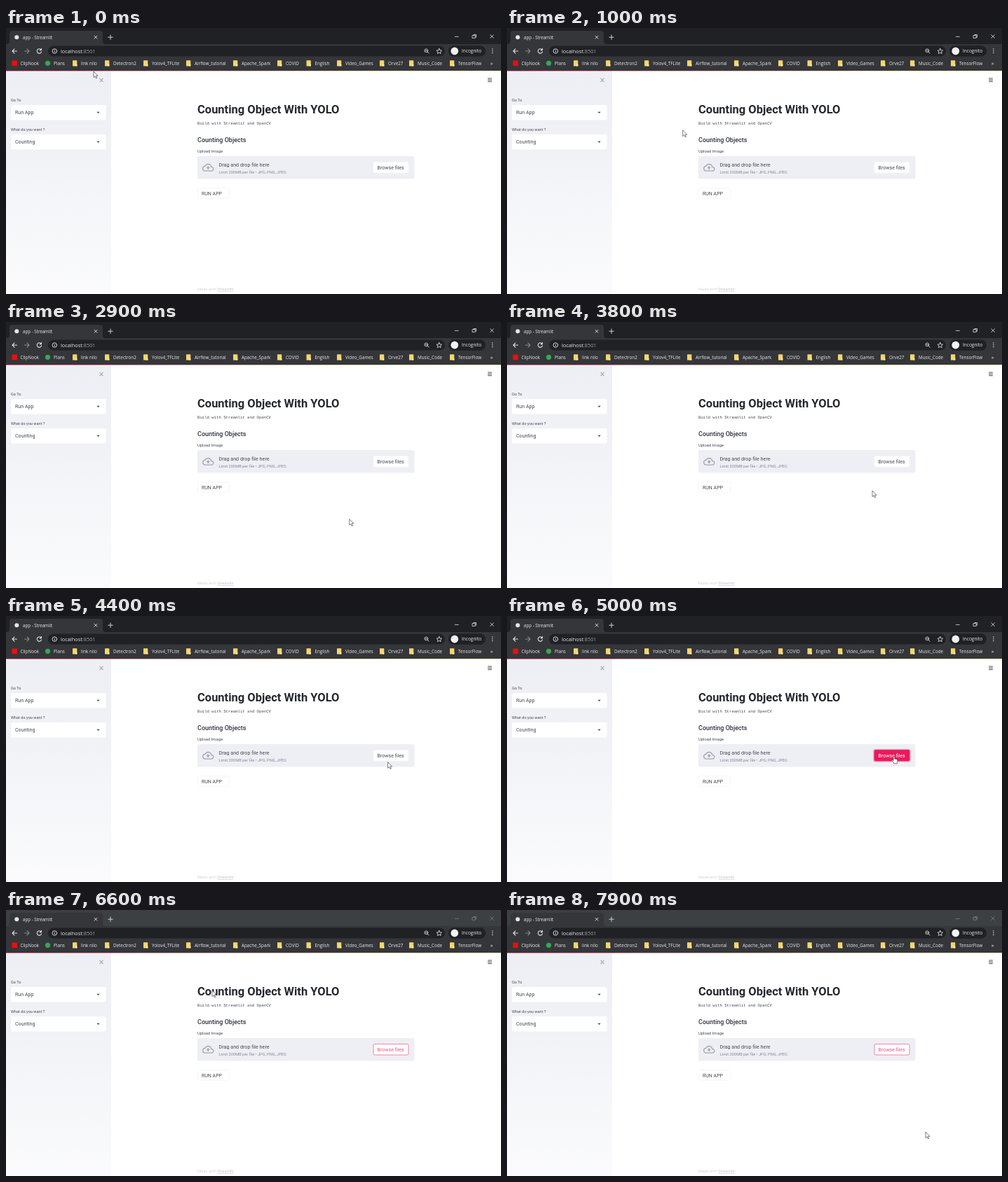
An HTML page for the animation above (8000 ms loop, 706 px wide and 380 px high).

```html
<!DOCTYPE html>
<html lang="en">
<head>
<meta charset="utf-8">
<title>Counting app</title>
<style>
html, body { margin: 0; width: 100%; height: 100%; overflow: hidden; background: #fff; }
svg { display: block; width: 706px; height: 380px; }
.ui { font-family: "Open Sans", "Noto Sans", sans-serif; fill: #e8eaed; }
.page { font-family: Roboto, sans-serif; fill: #474955; }
.mono { font-family: "Liberation Mono", monospace; }
.line { fill: none; stroke-linecap: round; stroke-linejoin: round; }
</style>
</head>
<body>
<svg id="stage" viewBox="0 0 706 380" xmlns="http://www.w3.org/2000/svg">
  <defs>
    <linearGradient id="side" x1="0" y1="0" x2="0" y2="1">
      <stop offset="0" stop-color="#eeeff4"/>
      <stop offset=".36" stop-color="#f1f2f6"/>
      <stop offset=".6" stop-color="#f5f6f9"/>
      <stop offset="1" stop-color="#fbfbfd"/>
    </linearGradient>
    <linearGradient id="trim">
      <stop offset="0" stop-color="#f63366"/>
      <stop offset="1" stop-color="#fffd80"/>
    </linearGradient>
  </defs>
  <rect width="706" height="380" fill="#fff"/>

  <g class="page">
    <rect y="61" width="150" height="319" fill="url(#side)"/>
    <path class="line" d="M133.8 72.2l4.4 4.4m0-4.4l-4.4 4.4" stroke="#a6a8b3" stroke-width="1.2"/>
    <g id="fields"></g>
    <path class="line" d="M687.5 72h5m-5 2.3h5m-5 2.3h5" stroke="#31333f" stroke-width=".9"/>
    <text x="273" y="121.5" font-size="16.5" font-weight="700" fill="#262730">Counting Object With YOLO</text>
    <text class="mono" x="273" y="138" font-size="5.65">Build with Streamlit and OpenCV</text>
    <text x="273" y="163" font-size="9" font-weight="500" fill="#31333f">Counting Objects</text>
    <text x="273" y="178" font-size="5.85">Upload Image</text>
    <rect x="273" y="183" width="309.5" height="32.5" rx="2.5" fill="#eeeff4"/>
    <path transform="translate(280 191) scale(.69)" fill="#a3a6b4" d="M19.35 10.04C18.67 6.59 15.64 4 12 4 9.11 4 6.6 5.64 5.35 8.04 2.34 8.36 0 10.91 0 14c0 3.31 2.69 6 6 6h13c2.76 0 5-2.24 5-5 0-2.64-2.05-4.78-4.65-4.96zM19 18H6c-2.21 0-4-1.79-4-4 0-2.05 1.53-3.76 3.56-3.97l1.07-.11.5-.95C8.08 7.14 9.94 6 12 6c2.62 0 4.88 1.86 5.39 4.43l.3 1.5 1.53.11c1.56.1 2.78 1.41 2.78 2.96 0 1.65-1.35 3-3 3zM8 13h2.55v3h2.9v-3H16l-4-4z"/>
    <text x="303.5" y="198.2" font-size="7.2">Drag and drop file here</text>
    <text x="303.5" y="207.7" font-size="5.7" fill="#85879a">Limit 200MB per file • JPG, PNG, JPEG</text>
    <rect id="ring" x="522.3" y="190" width="53.4" height="18.6" rx="2.5" fill="#f9a3ba"/>
    <rect id="browse" x="524" y="191.5" width="50" height="15.5" rx="1.8" stroke-width=".7"/>
    <text id="browseText" x="529.5" y="201.8" font-size="7.05">Browse files</text>
    <rect x="273.4" y="228.6" width="45" height="14.6" rx="2" fill="#fff" stroke="#f3f3f6" stroke-width=".8"/>
    <text x="279" y="238.6" font-size="7">RUN APP</text>
    <text x="273" y="375" font-size="5.8" fill="#d3d4d8">Made with <tspan text-decoration="underline" fill="#c4c5ca">Streamlit</tspan></text>
  </g>

  <g class="ui">
    <rect id="strip" width="706" height="24"/>
    <path d="M1 23q4 0 4-4V8q0-4 4-4h125q4 0 4 4v11q0 4 4 4z" fill="#35363a"/>
    <rect y="23" width="706" height="38" fill="#35363a"/>
    <rect y="61" width="706" height=".6" fill="url(#trim)"/>
    <circle cx="15.3" cy="13.3" r="3" fill="#e6e6e8"/>
    <text x="24" y="15.7" font-size="6.2">app - Streamlit</text>
    <path class="line" d="M126 11.2l4 4m0-4l-4 4M145.8 13.2h6.4m-3.2-3.2v6.4" stroke="#dfe1e5" stroke-width=".9"/>
    <g id="controls" class="line" stroke="#dfe1e5" stroke-width=".8">
      <path d="M640.3 12.4h5M690.7 9.7l4.8 4.8m0-4.8l-4.8 4.8M667 10.5v-1h3.6v3.6h-1"/>
      <rect x="665.4" y="10.6" width="3.8" height="3.8"/>
    </g>

    <g class="line" stroke="#e0e2e6" stroke-width="1.1">
      <path d="M15.5 33H9m3-3.1L9 33l3 3.1"/>
      <path d="M26.5 33h6.5m-3-3.1l3 3.1-3 3.1" stroke="#85878b"/>
      <path d="M50.1 31.2A3.2 3.2 0 1 0 50.5 33.8M50.4 29.4v2.2h-2.2"/>
    </g>
    <rect x="60" y="25.5" width="566" height="15" rx="7.5" fill="#202124"/>
    <g class="line" stroke="#e0e2e6" stroke-width=".9">
      <circle cx="69.3" cy="33" r="3.3"/>
      <path d="M69.3 32.8v1.8m0-3.3v.1"/>
    </g>
    <text x="78" y="35.6" font-size="7.35">localhost<tspan fill="#9aa0a6">:8501</tspan></text>
    <g class="line" stroke="#d5d7db" stroke-width=".9">
      <circle cx="599.3" cy="32.3" r="2.4"/>
      <path d="M601.1 34.1l2.1 2.1M598.2 32.3h2.2"/>
      <path d="M617.8 29.3l1.1 2.5 2.7.3-2 1.8.6 2.7-2.4-1.4-2.4 1.4.6-2.7-2-1.8 2.7-.3z"/>
    </g>
    <rect x="631" y="25.3" width="53" height="15.4" rx="7.7" fill="#202124"/>
    <circle cx="639.8" cy="33" r="5.4" fill="#f1f3f4"/>
    <text x="650" y="35.3" font-size="6.5">Incognito</text>
    <path class="line" d="M693.8 30v.01m0 2.79v.01m0 2.79v.01" stroke="#e0e2e6" stroke-width="1.5"/>

    <g id="marks"></g>
    <text x="690.8" y="52.8" font-size="7.6">»</text>
  </g>

  <g id="cursor" stroke="#3a3a3a" stroke-width=".65" stroke-linejoin="round" fill="#fff">
    <path id="arrow" d="M0 0v8.6l2-1.8 1.4 3.1 1.4-.6-1.4-3h2.7z"/>
    <path id="hand" d="M-.9.7q.9-1.3 1.8 0V4l3 .7q1.3.3 1.2 1.7l-.6 3.1v1.3H-.4V9.7L-3 6.6q-.5-1.1.6-1.2l1.5 1.2z"/>
  </g>
</svg>
<script>
const $ = id => document.getElementById(id);
const LOOP = 8000, STEP = 100;
const PINK = '#f2557f', HOT = '#ea1a5c';

const bookmarks = [
  ['ClipNook', 20.5], ['Plans', 68], ['link nilo', 107], ['Detectron2', 153],
  ['Yolov4_TFLite', 208], ['Airflow_tutorial', 269], ['Apache_Spark', 336],
  ['COVID', 399], ['English', 440.5], ['Video_Games', 484], ['Orve27', 545],
  ['Music_Code', 587], ['TensorFlow', 645]
];

const icon = (i, x) => i === 0 ? `<rect x="${x - 12}" y="46.6" width="7.4" height="7.4" fill="#f00d0d"/>`
  : i === 1 ? `<circle cx="${x - 8.5}" cy="50.3" r="3.6" fill="#34a853"/>`
  : `<rect x="${x - 12}" y="46.3" width="6.3" height="8.2" rx=".6" fill="#f5d66c"/>
     <path d="M${x - 7.6} 51.8h1.9v2.7h-1.9z" fill="#fdf0b8"/>`;

$('marks').innerHTML = bookmarks.map(([name, x], i) =>
  `${icon(i, x)}<text x="${x}" y="52.8" font-size="6.3">${name}</text>`).join('');

const field = (label, value, y) => `
  <text x="7" y="${y - 5.5}" font-size="5.6">${label}</text>
  <rect x="7" y="${y}" width="135.5" height="21.5" rx="2" fill="#fff"/>
  <text x="13" y="${y + 13.2}" font-size="7.1">${value}</text>
  <path d="M129.3 ${y + 9.8}h4.4l-2.2 2.3z"/>`;

$('fields').innerHTML = field('Go To', 'Run App', 110) + field('What do you want ?', 'Counting', 152);

// Pointer stops: time, x, y
const path = [
  [0, 125, 62], [600, 175, 95], [1600, 390, 240], [1900, 419, 320], [2200, 419, 320],
  [3100, 500, 276], [3800, 521, 241], [4100, 526, 234], [4500, 548, 204], [4800, 552, 200],
  [5100, 552, 200], [5300, 549, 200], [5700, 500, 186], [6600, 294, 115], [6800, 325, 140],
  [7200, 572, 311], [7600, 594, 316], [7900, 597, 317], [8000, 597, 317]
];

function pointer(t) {
  const i = path.findIndex((p, n) => t < path[n + 1][0]);
  const [t0, x0, y0] = path[i], [t1, x1, y1] = path[i + 1];
  const u = (t - t0) / (t1 - t0), e = u * u * (3 - 2 * u);
  return [x0 + (x1 - x0) * e, y0 + (y1 - y0) * e];
}

function set(id, attrs) {
  for (const key in attrs) $(id).setAttribute(key, attrs[key]);
}

function show(id, on) { $(id).style.display = on ? '' : 'none'; }

function draw(t) {
  const hover = t >= 4500 && t < 5200;
  const pressed = t >= 4900 && t < 5200;
  const away = t >= 5200;
  const lit = hover || away;

  const [x, y] = pointer(t);
  set('cursor', { transform: `translate(${x.toFixed(2)} ${y.toFixed(2)})` });
  show('arrow', !hover);
  show('hand', hover);

  show('ring', pressed);
  set('browse', { fill: pressed ? HOT : '#fff', stroke: pressed ? HOT : lit ? PINK : '#f6f6f9' });
  set('browseText', { fill: pressed ? '#fff' : lit ? PINK : '#474955' });

  set('strip', { fill: away ? '#3c4043' : '#202124' });
  set('controls', { opacity: away ? .4 : 1 });
}

const start = performance.now();
function tick() {
  const t = (performance.now() - start) % LOOP;
  draw(Math.floor(t / STEP) * STEP);
  requestAnimationFrame(tick);
}
tick();
</script>
</body>
</html>
```
